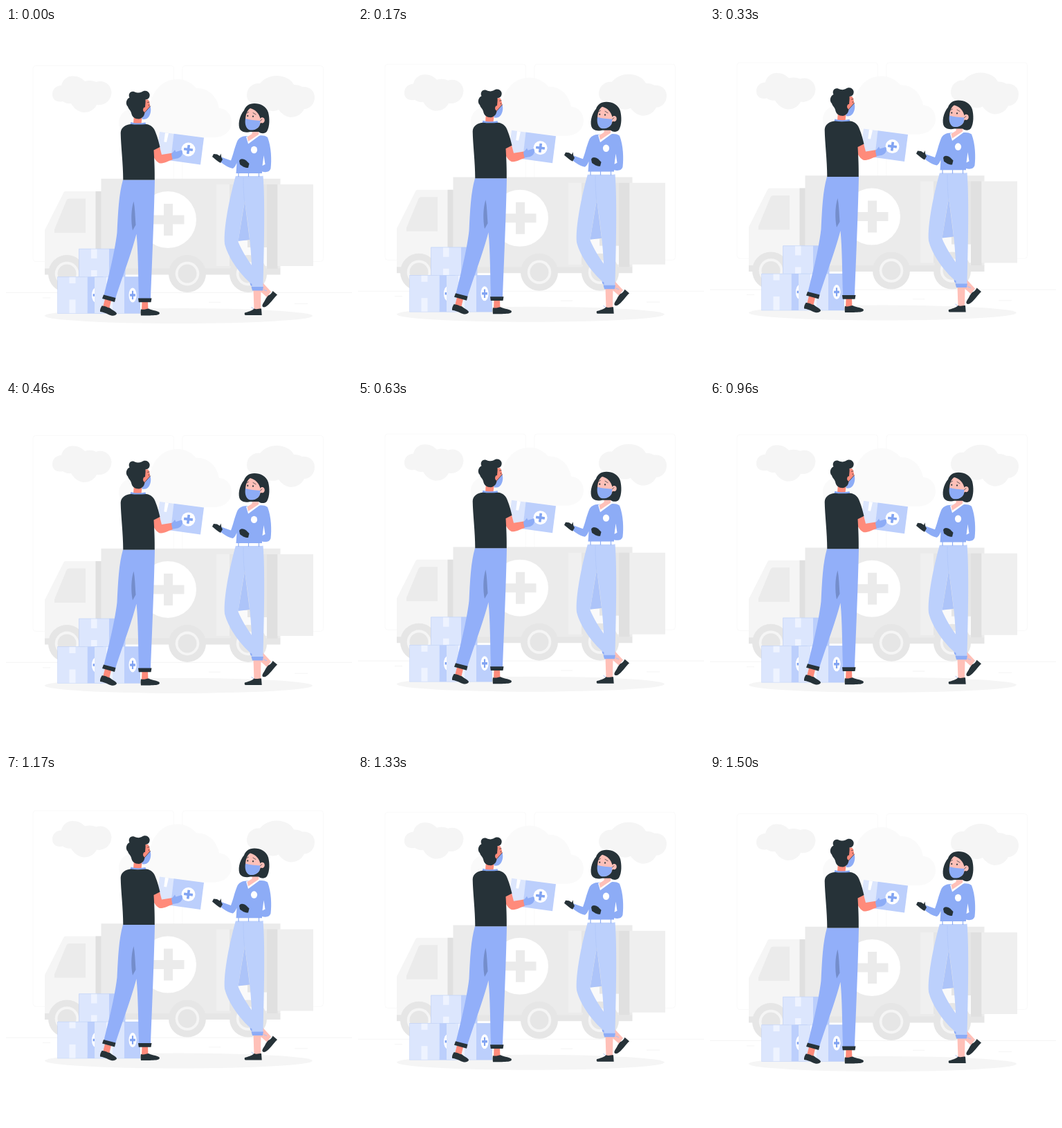
An HTML page that plays this animation: 500 px wide and 500 px high, repeating every 1540 ms.

```html
<!DOCTYPE html>
<html lang="en">
<head>
<meta charset="utf-8">
<title>Delivery</title>
<style>
html, body { margin: 0; width: 100%; height: 100%; overflow: hidden; background: #fff; }
svg { display: block; width: 100vw; height: 100vh; }
.w { fill: #fff; }
.g0 { fill: #fafafa; }
.g1 { fill: #f5f5f5; }
.g2 { fill: #f0f0f0; }
.g3 { fill: #ebebeb; }
.g4 { fill: #e0e0e0; }
.g5 { fill: #e6e6e6; }
.ink { fill: #263238; }
.blue { fill: #8dacf6; }
.deep { fill: #82a4f2; }
.mid { fill: #bccffc; }
.pale { fill: #dce6fd; }
.tape { fill: #eef3ff; }
.tan { fill: #ff8b7b; }
.pink { fill: #ffc0b8; }
.line { fill: none; stroke: #263238; stroke-width: .7; stroke-linecap: round; }
</style>
</head>
<body>
<svg viewBox="0 0 500 500">
<defs>
  <path id="plus" d="M-6.5 -23H6.5V-6.5H23V6.5H6.5V23H-6.5V6.5H-23V-6.5H-6.5Z"/>
  <g id="wheel">
    <circle r="27" class="g5"/>
    <circle r="17.3" class="g1"/>
    <circle r="13.5" class="g5"/>
  </g>
  <g id="crate">
    <path class="pale" d="M0 0H43V53H0Z"/>
    <path class="mid" d="M43 0H66V53H43Z"/>
    <path class="tape" d="M17 0H26V9.500H17ZM17 33H26V53H17Z"/>
    <ellipse class="w" cx="55" cy="26.500" rx="5.500" ry="10.500"/>
    <use href="#plus" class="deep" transform="translate(55 26.500) scale(.17 .27)"/>
    <path d="M0 .2H66" stroke="#b5c9f5" stroke-width=".5"/>
  </g>
</defs>
<g id="scene">
  <!-- backdrop -->
  <g fill="none" stroke="#f8f8f8" stroke-width=".8">
    <rect x="39" y="54.500" width="203.500" height="283" rx="4"/>
    <rect x="255" y="54.500" width="203.500" height="283" rx="4"/>
  </g>
  <path d="M0 382.500H500M53 390H64M293 396.300H310M417 398.300H436M374 391H382" stroke="#ededed" stroke-width=".6"/>
  <path class="g0" d="M163 137C163 126 172 116 184 117C194 118 201 120 206 123C208 94 224 74 248 74C260 74 269 80 275 87C291 86 305 98 308 116C318 116 326 125 326 136C326 149 315 158 301 158H184C171 156 163 148 163 137Z"/>
  <path class="g1" d="M67 96C67 88 73 83 80 83C82 74 89 69.500 96 69.500C105 69.500 110 73 114 77C120 75 126 76 130 78C142 74 152 82 152.500 93C152 106 141 113 131 111C127 119 120 122 112 122C104 121 98 116 94 109C89 110 85 108 82 106C74 108 67 104 67 96Z"/>
  <path class="g1" d="M348 97C348 87 356 79 367 80C373 73 381 69 391 69C402 69 412 74 416 82C421 82 425 83 428 85C439 84 446 91 446 100C446 110 439 117 431 117C427 125 420 129 411 129C404 128 398 124 394 118C385 123 371 118 365 107C355 111 348 106 348 97Z"/>

  <!-- truck -->
  <path class="g1" d="M56 348V292L83.500 237.500Q84 236 86 236H138V348Z"/>
  <path class="g3" d="M70 296V291L87.500 249Q88.500 246.500 91 246.500H115V296Z"/>
  <path class="g4" d="M129.500 236H138V348H129.500Z"/>
  <path class="g3" d="M137.500 217.800H396.500V348H137.500Z"/>
  <path class="g2" d="M304 226H323V344H304Z"/>
  <path class="g5" d="M323 226H377V344H323Z"/>
  <path class="g0" d="M335 307H349V317H377V344H335Z"/>
  <path class="g4" d="M377 226H392.500V348H377Z"/>
  <path class="g5" d="M56 347.500H396.500V356.500H56Z"/>
  <path fill="#efefef" d="M392.500 226H444V344H392.500Z"/>
  <circle class="w" cx="234" cy="277" r="41"/>
  <use href="#plus" class="g3" x="234.500" y="277"/>
  <use href="#wheel" x="88" y="355"/>
  <use href="#wheel" x="262" y="355"/>
  <use href="#wheel" x="350" y="355"/>

  <ellipse class="g1" cx="249.500" cy="416" rx="193.500" ry="11"/>

  <!-- stacked crates -->
  <path class="pale" d="M105.500 319H149V359.500H105.500Z"/>
  <path class="mid" d="M149 319H172.500V359.500H149Z"/>
  <path class="tape" d="M123 319H131.500V333H123ZM123 350H131.500V359.500H123Z"/>
  <path d="M105.500 359V319.200H172.500" fill="none" stroke="#b5c9f5" stroke-width=".5"/>
  <use href="#crate" x="74.500" y="359.500"/>
  <use href="#crate" x="128" y="359.500"/>
  <path d="M74.500 359.500V412.500H194" fill="none" stroke="#b5c9f5" stroke-width=".4"/>

  <!-- handed box -->
  <path class="pale" d="M222 150L243 153L238.500 192L217 189Z"/>
  <path class="mid" d="M242.500 152.800L286 158.500L281 197.500L238 191.500Z"/>
  <path class="w" d="M230 151.200L235 152L232 165L228.300 164.500Z"/>
  <circle class="w" cx="263.500" cy="175.500" r="10"/>
  <use href="#plus" class="deep" transform="translate(263.500 175.500) rotate(7) scale(.28)"/>

  <g id="man" transform="translate(0 .5)">
    <path class="tan" d="M143 391L152 393.500L149 406L140 403ZM196.500 395H205L205.500 408H196Z"/>
    <path fill="#92aff9" d="M169 219H215C214 270 211 340 209 391H192C191 355 191 322 188.500 297C181 326 166 365 158 391L141.500 386C147 363 157 325 160.500 295C162 265 163 240 169 219Z"/>
    <path fill="#748dcb" d="M184.500 250C180.500 262 180.500 280 183 292L187.500 284C186.500 272 186.500 260 184.500 250Z"/>
    <path class="ink" d="M141 385L158.500 389.500L157 395.500L139 390.500ZM191 390H210.500L209.500 395.800H191.800Z"/>
    <path class="ink" d="M138.500 401C143 400.500 146 403.500 150 404C154 407.500 160 409.500 160 412.500C158 416 153 416 148 413.500C144 411.500 140 410 136 409.500C135.500 406.500 137 403.500 138.500 401Z"/>
    <path class="ink" d="M195 406C199 407 203 405.500 206 405C211 408 221.500 408 222 411.500C221.500 415 214 414.500 208 415H195C194.500 411.500 194.500 408.500 195 406Z"/>

    <path class="tan" d="M210 175L222 171L225 182.500L241 180V189.500C234 192 228 195.500 222 195C215 192 212 183 210 175Z"/>
    <path class="blue" d="M239 181.500L242.500 177.500L244 175.500L245.500 178.500L254 176C256 179 255 184 251 186.500C248 188.500 244 188.500 240.500 189.300Z"/>
    <path class="tan" d="M185 125H197L195.500 138H184Z"/>
    <path class="deep" d="M179.500 139L180.500 135.500C187 137.500 195 137.500 201.500 136L202.500 140Z"/>
    <path class="ink" d="M181 138.500C188 139.500 196 139 203 138.500C210 139.500 214 144 216 150C219 157 221 165 222.500 171.500L213.500 176C214.500 192 215 207 214.800 219H169.300C169.300 195 166 170 165.700 151C166 143 173 139 181 138.500Z"/>

    <path class="tan" d="M198 103H205.500C207.500 106 208 110 208.500 114L204 127L195 128Z"/>
    <path class="blue" d="M208.500 112.500C210.500 119 208.500 127 204 130C201 132 198 131.500 196 130.500C198 127 200 124 201 121Z"/>
    <path class="ink" d="M178.500 100C176 95 180 90 185 91.500C189 93 192 94 196 92C200 89 206 90 207.500 95C208.500 100 205 103 201.500 103C202 107 201 111 201 115C198.500 115 198 117 198.500 119L200.500 121C200.500 125 198 130 192 131C186 131 182 128 181 122C180 118 177 117 176 113C172 109 174 102 178.500 100Z"/>
    <ellipse class="tan" cx="200.500" cy="117.500" rx="2.200" ry="3.600"/>
    <path class="line" d="M204.500 107L207 106.500M206.500 110.500V111.700M201 121L208.500 112.500"/>
  </g>

  <g id="woman">
    <path class="pink" d="M370 367L383 381L377 389L367 380ZM357.500 378H368.500L368 408H358.500Z"/>
    <path class="ink" d="M385.500 380L392 385.500C386 391 381 400 375 403C371 404.500 369 402 371.500 398C375 393 376 389 379 386.500C382 385.500 384 383 385.500 380Z"/>
    <path class="ink" d="M345 411.500C350 410 355 409 358.500 405.500C362 407 365 405.500 369 405.500L369.700 415H346C344.500 415 344.500 412.500 345 411.500Z"/>
    <path d="M372 378L377 380M354.500 403.500L358 406" stroke="#a9c2f8" fill="none"/>
    <path fill="#adc4f9" d="M345 250L335.500 308L352 306Z"/>
    <path fill="#bcd0fc" fill-rule="evenodd" d="M332 213.500H371.500C374.500 250 373 315 371.500 375.500H355.500L355 370C338 356 321 332 316 312C314 290 323 245 332 213.500ZM345 250C341 272 338 292 335.500 309C340 320 348 333 355 343C354 315 350 285 345 250Z"/>
    <path d="M343 216C343 232 343.500 242 345 254" fill="none" stroke="#adc4f9" stroke-width=".6"/>
    <path class="blue" d="M354.500 374H372L371 379.500H356ZM352.500 368L355.500 370V374L353 371Z"/>

    <path class="blue" d="M348 156C341 156 336 159 334 164C330 174 328 184 325 191.500L311 186.500L309.500 193C315 198 322 202 328 203C331 201 332 198 333.500 195L332.500 210H370V207.500C376 209 381 208 382.500 203C384 191 383.500 172 378 158C375 155.500 370 155 366 155.500Z"/>
    <path class="w" d="M372.500 184L374.500 197L370.500 199Z"/>
    <path class="w" d="M332.500 210H370.500V214H332Z"/>
    <path d="M336 209V215M350.500 209V215M365.500 209V215" stroke="#8dacf6" stroke-width="1.200"/>
    <path class="w" d="M347 157L350 167.500L367 155L364 152Z"/>
    <path class="pink" d="M356 143H366L365 154L350 164L348.500 157.500L355.500 153Z"/>
    <ellipse class="w" cx="358.500" cy="176" rx="4.600" ry="5.200"/>
    <path class="ink" d="M298 186L300 182L305 182.500L309 185L310.500 181.500L311.300 187L313 190L310 195C306 193 302 189 298 186Z"/>
    <path class="ink" d="M337 192C339 188 343 189 347 191.500L351.500 196L350 202C345 202.500 341 199.500 338 197Z"/>

    <path class="ink" d="M359 109C351 109 346 113 344 119C337 127 334.500 141 338.500 147C342 151 349 151.500 353 150H365C369 153 374 153 377 149.500C381.500 142 381 130 379 122C376 113 368 109 359 109Z"/>
    <path class="pink" d="M353 116C348 119 346 126 346 134L348 144C354 149 362 147 365 143L368 137C373 139 375 134 373 130.500C371 128.500 368.500 129 367.500 131C366 124 361 118 353 116Z"/>
    <path class="blue" d="M346 131C353 133 359 133.500 367.500 134L366.500 141C363 147 356 148.500 351 147C346 144 345 137 346 131Z"/>
    <path class="line" d="M348 123L350.500 121.500M357 122.500L361 125M367.500 134L370 132"/>
    <ellipse class="ink" cx="349.300" cy="127" rx=".9" ry="1.300"/>
    <ellipse class="ink" cx="357" cy="127.700" rx=".9" ry="1.300"/>
  </g>
</g>
</svg>
<script>
const scene = document.getElementById('scene');
const LOOP = 1540, TICK = 1000 / 24, HALF = 750, RISE = 10;

// Linear float up and back, held on a 24 fps beat.
function draw() {
  const t = performance.now() % LOOP;
  const beat = Math.floor((t + 5) / TICK) * TICK;
  const y = RISE * Math.max(0, 1 - Math.abs(beat - HALF) / HALF);
  scene.setAttribute('transform', `translate(0 ${-y.toFixed(3)})`);
  requestAnimationFrame(draw);
}
draw();
</script>
</body>
</html>
```
